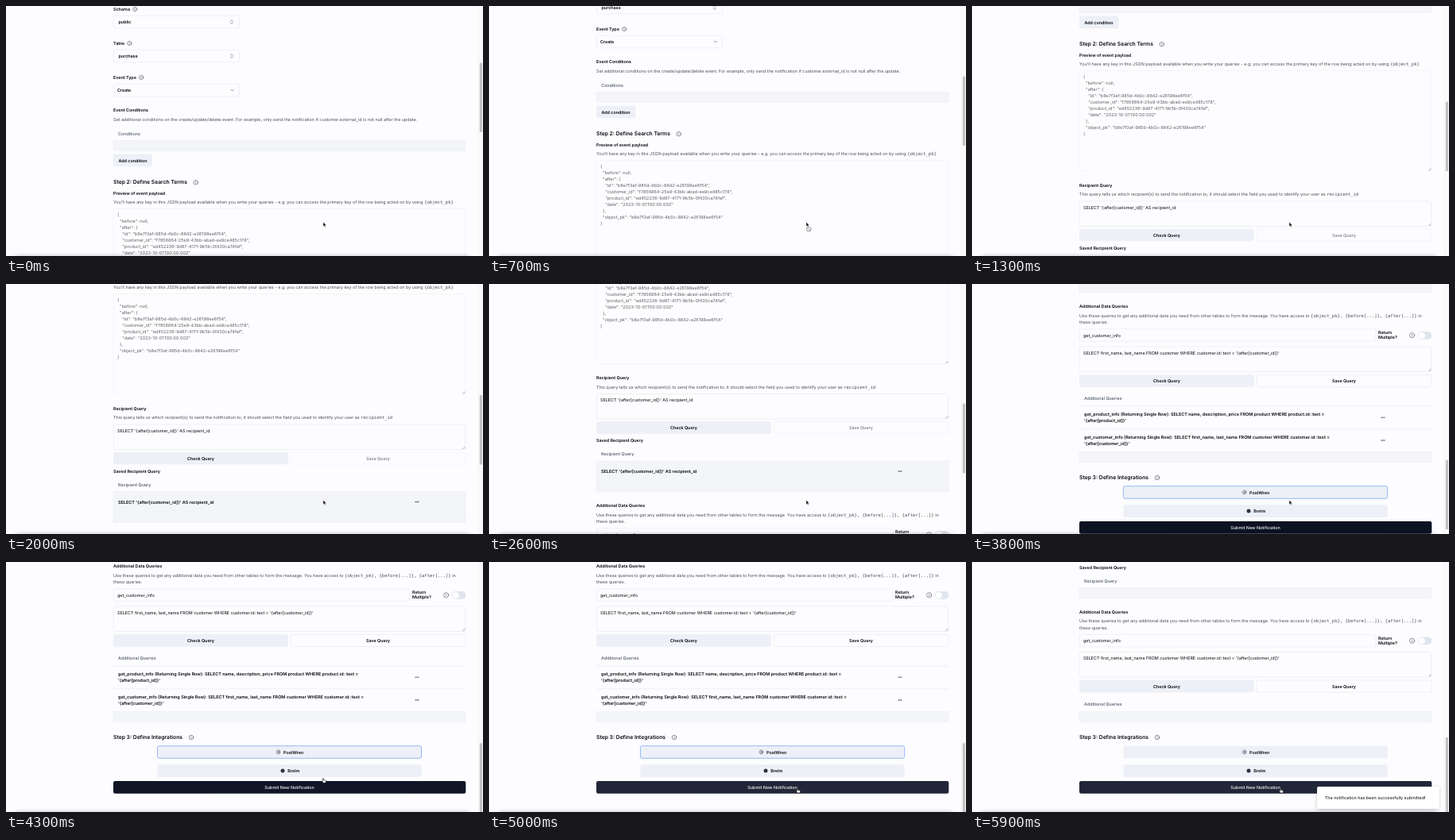
Animation of 600 by 315 pixels, one loop 6 s. Source, as an HTML page:

```html
<!DOCTYPE html>
<html lang="en">
<head>
<meta charset="utf-8">
<title>Notification form</title>
<style>
html, body { margin: 0; width: 100%; height: 100%; overflow: hidden; background: #fdfcfe; }
svg { display: block; width: 600px; height: 315px; }
text { font: 400 5.42px Inter, sans-serif; fill: #05070c; white-space: pre; text-rendering: geometricPrecision; }
.m { font-weight: 600; font-size: 5.36px; }
.row { font-weight: 600; font-size: 5.45px; }
.h { font-size: 6.75px; font-weight: 600; }
.d { fill: #4a4d55; }
.th { fill: #4d586b; font-weight: 500; }
.json { fill: #606267; font-size: 5.53px; }
.off { fill: #777a81; font-weight: 500; }
.inv { fill: #f8fafc; font-weight: 500; }
.c { text-anchor: middle; }
.code { font: 5.556px "DejaVu Sans Mono", monospace; }
.line { fill: none; stroke: #e5e8ee; stroke-width: .6; }
.dim { opacity: .6; }
.fill { fill: #edf0f6; }
.band { fill: #f3f5f8; stroke: #e8ebf0; stroke-width: .4; }
.ico { fill: none; stroke: #3c4350; stroke-width: .55; stroke-linecap: round; stroke-linejoin: round; }
</style>
</head>
<body>
<svg id="stage" viewBox="0 0 600 315"></svg>
<script>
const LOOP = 6000, STEP = 100, END = 555.5;
const LEFT = 135, RIGHT = 578;

// Text is placed by the middle of its capitals.
const text = (x, mid, str, cls = '') => `<text x="${x}" y="${mid + 2.15}" class="${cls}">${str}</text>`;
const code = str => `<tspan class="code">${str}</tspan>`;
const rect = (x, y, w, h, cls, r = 2.2, more = '') =>
  `<rect x="${x}" y="${y}" width="${w}" height="${h}" rx="${r}" class="${cls}" ${more}/>`;
const path = (d, more = 'class="ico"') => `<path d="${d}" ${more}/>`;
const info = (x, y, r = 2.6) => `<circle cx="${x}" cy="${y}" r="${r}" class="ico"/>` +
  path(`M${x} ${y - .1}v1.3M${x} ${y - 1.2}v.1`);
const dots = y => [515.2, 517, 518.8].map(x => `<circle cx="${x}" cy="${y}" r=".65" fill="#1f2937"/>`).join('');
const band = (y, h = 13) => rect(LEFT, y, RIGHT - LEFT, h, 'band', 0);

const select = (mid, label, x, chevron) => rect(LEFT + .3, mid - 7.8, 158, 15.6, 'line') +
  text(x, mid, label, 'm') + path(chevron);
const upDown = y => `M282.3 ${y - .9}l1.5 -1.5l1.5 1.5M282.3 ${y + .9}l1.5 1.5l1.5 -1.5`;
const down = y => `M283.3 ${y - .7}l1.5 1.5l1.5 -1.5`;
const area = (y, h, cls = '') => rect(LEFT + .3, y, RIGHT - LEFT - .6, h, 'line ' + cls) +
  path(`M574.6 ${y + h - 1}l2.4 -2.4M576 ${y + h - 1}l1 -1`, 'class="ico" stroke-opacity=".6"');
const queryButtons = (mid, saveCls, boxCls = '') => rect(LEFT, mid - 7.8, 219.7, 15.6, 'fill') +
  rect(358, mid - 7.6, 220, 15.2, 'line ' + boxCls) +
  text(245, mid, 'Check Query', 'm c') + text(468, mid, 'Save Query', saveCls + ' c');

const id = 'b8e7f3af-985d-4b0c-8842-e26198ee6f54';
const payload = [
  [0, '{'], [1, '"before": null,'], [1, '"after": {'],
  [2, `"id": "${id}",`],
  [2, '"customer_id": "f7856864-25e9-43bb-abad-ee9ce485c178",'],
  [2, '"product_id": "ed452236-9d87-4171-9b5b-0f430ca74faf",'],
  [2, '"date": "2023-10-01T00:00:00Z"'],
  [1, '},'], [1, `"object_pk": "${id}"`], [0, '}']
];

const upper = [
  text(LEFT, 4, 'Schema', 'm'), info(162.3, 4), select(20, 'public', 141.5, upDown(20)),
  text(LEFT, 47, 'Table', 'm'), info(155.3, 47), select(63, 'purchase', 141.5, upDown(63)),
  text(LEFT, 90, 'Event Type', 'm'), info(170.2, 90), select(106, 'Create', 140, down(106)),
  text(LEFT, 131, 'Event Conditions', 'm'),
  text(LEFT, 142.5, 'Set additional conditions on the create/update/delete event. For example, only send the notification if customer.external_id is not null after the update.', 'd'),
  text(141, 160.5, 'Conditions', 'th'), band(169.5),
  rect(LEFT, 186.7, 49, 15.6, 'fill'), text(159.5, 194.5, 'Add condition', 'm c'),
  text(LEFT, 222, 'Step 2: Define Search Terms', 'h'), info(238.7, 222.2, 2.8),
  text(LEFT, 235.5, 'Preview of event payload', 'm'),
  text(LEFT, 246.5, "You'll have any key in this JSON payload available when you write your queries - e.g. you can access the primary key of the row being acted on by using " + code('{object_pk}'), 'd'),
  area(255.5, 126.5, 'dim'),
  ...payload.map(([depth, s], i) => text(140 + 3.1 * depth, 263 + 7.94 * i, s, 'json')),
  text(LEFT, 399.5, 'Recipient Query', 'm'),
  text(LEFT, 411, 'This query tells us which recipient(s) to send the notification to; it should select the field you used to identify your user as ' + code('recipient_id'), 'd'),
  area(420, 31.5), text(140, 427.5, "SELECT '{after[customer_id]}' AS recipient_id"),
  queryButtons(462.5, 'off', 'dim'),
  text(LEFT, 478.5, 'Saved Recipient Query', 'm'), text(141, 495.5, 'Recipient Query', 'th')
];

const saved = [
  rect(LEFT, 504.5, 443, 26, 'band', 0, 'id="hover"'),
  text(141, 517.5, "SELECT '{after[customer_id]}' AS recipient_id", 'row'), dots(517.5)
];

const middle = [
  band(530.5),
  text(LEFT, 560.5, 'Additional Data Queries', 'm'),
  text(LEFT, 572.3, 'Use these queries to get any additional data you need from other tables to form the message. You have access to ' +
    code('{object_pk}, {before[...]}, {after[...]}') + ' in', 'd'),
  text(LEFT, 580.5, 'these queries.', 'd'),
  rect(LEFT + .3, 589.3, 372.5, 15.5, 'line'), text(140, 597, 'get_customer_info'),
  text(511, 593.8, 'Return', 'm'), text(511, 599.5, 'Multiple?', 'm'), info(553.6, 597.2, 3.1),
  rect(561, 592.6, 17.4, 9.6, '', 4.8, 'fill="#e0e5ed"'), '<circle cx="565.8" cy="597.4" r="4" fill="#fff"/>',
  area(611.5, 31.5),
  text(140, 619, "SELECT first_name, last_name FROM customer WHERE customer.id::text = '{after[customer_id]}'"),
  queryButtons(654.5, 'm'),
  text(141, 676.5, 'Additional Queries', 'th')
];

const extraRow = (y, name, fields) =>
  path(`M${LEFT} ${y}H${RIGHT}`, 'class="line"') +
  text(141, y + 10, `get_${name}_info (Returning Single Row): SELECT ${fields} FROM ${name} WHERE ${name}.id::text =`, 'row') +
  text(141, y + 18, `'{after[${name}_id]}'`, 'row') + dots(y + 14.2);
const extras = [
  extraRow(686.5, 'product', 'name, description, price'),
  extraRow(715.3, 'customer', 'first_name, last_name')
];

const lower = [
  band(744),
  text(LEFT, 776.5, 'Step 3: Define Integrations', 'h'), info(233, 776.5, 2.8),
  rect(190.4, 787.2, 332.2, 15.6, 'fill', 2.2, 'id="mail"'),
  '<circle cx="342.6" cy="795" r="1" class="ico"/>',
  path('M343.6 794v1.3a.75 .75 0 0 0 1.5 0v-.3a2.5 2.5 0 1 0 -1 2'),
  text(349, 795, 'PostWren', 'm'),
  rect(190.4, 810.8, 332.2, 15.6, 'fill'),
  '<circle cx="348" cy="818.6" r="2.5" fill="#2b3342"/>', text(354.3, 818.6, 'Brelm', 'm'),
  rect(LEFT, 831.6, 443.3, 15.6, '', 2.2, 'id="submit"'),
  text(356.6, 839.5, 'Submit New Notification', 'inv c')
];

const group = (name, parts) => `<g id="${name}">${parts.join('')}</g>`;
const stage = document.getElementById('stage');
stage.innerHTML = `
<defs>
  <filter id="blur" x="-10%" y="-100%" width="120%" height="300%"><feGaussianBlur stdDeviation="3.5"/></filter>
  <filter id="soft" x="-20%" y="-50%" width="140%" height="200%"><feDropShadow dx="0" dy="1.5" stdDeviation="2.5" flood-color="#000" flood-opacity=".2"/></filter>
</defs>
<rect width="600" height="315" fill="#fdfcfe"/>` +
  group('upper', upper) + group('saved', saved) + group('middle', middle) +
  group('extras', extras) + group('lower', lower) +
  '<rect x="594" width="6" height="315" fill="#fafafa"/>' + path('M594.2 0V315', 'stroke="#e8e8e8" stroke-width=".5"') +
  rect(595.8, 0, 3.2, 10, '', 1.6, 'id="thumb" fill="#c2c2c2"') +
  group('toast', [
    rect(434, 283, 153.5, 28, '', 2, 'fill="#fff" filter="url(#soft)"'),
    text(443.8, 297, 'The notification has been successfully submitted!')
  ]) +
  rect(10, 317, 575, 24, '', 6, 'fill-opacity=".45" filter="url(#blur)"') +
  group('arrow', [path('M0 0V5.6L1.3 4.4L2.2 6.4L3.1 6L2.2 4.1H4Z', 'fill="#000" stroke="#fff" stroke-width=".5"')]) +
  group('denied', ['<circle cx="3.3" cy="8.9" r="2.8" fill="#fff" stroke="#85878c" stroke-width=".9"/>',
    path('M1.4 7L5.2 10.8', 'stroke="#85878c" stroke-width=".9"')]) +
  group('hand', [path('M-.5 .4Q0 -.3 .6 .4V2.4L3 2.8Q3.6 3 3.5 3.7L3 6H.2L-1.7 3.6Q-1.5 2.7 -.5 3.5Z',
    'fill="#fff" stroke="#111" stroke-width=".55" stroke-linejoin="round"')]);

const el = {};
for (const node of stage.querySelectorAll('[id]')) el[node.id] = node;

const scrollKeys = [
  [100, 0], [300, 14], [450, 14], [700, 61], [1100, 145], [1500, 203], [2000, 243], [2300, 250],
  [2430, 250], [2700, 300], [3100, 394], [3500, 486], [3800, 532.5], [4000, 549], [4200, END]
];
const pointerX = [[4500, 399], [5000, 388]];
const pointerY = [[4500, 272.3], [5000, 285]];
const toastY = [[5300, 32], [5400, 14], [5500, 4], [5600, 0]];

function at(keys, t) {
  if (t <= keys[0][0]) return keys[0][1];
  for (let i = 1; i < keys.length; i++) {
    const [t0, a] = keys[i - 1], [t1, b] = keys[i];
    if (t <= t1) return a + (b - a) * (t - t0) / (t1 - t0);
  }
  return keys[keys.length - 1][1];
}
const move = (node, x, y) => node.setAttribute('transform', `translate(${x} ${y})`);
const show = (node, on) => node.setAttribute('visibility', on ? 'visible' : 'hidden');

function draw(t) {
  const y = at(scrollKeys, t), sent = t >= 5300;
  // Emptied tables shorten the page, which stays pinned to its end.
  move(el.upper, 0, (sent ? 83.5 : 0) - y);
  move(el.middle, 0, (sent ? 57.5 : 0) - y);
  for (const node of [el.saved, el.extras, el.lower]) move(node, 0, -y);
  show(el.saved, !sent);
  show(el.extras, !sent);
  el.hover.style.fill = t >= 1800 ? '#f3f5f8' : '#fdfcfe';

  el.mail.style.stroke = sent ? 'none' : '#6b9ff0';
  el.mail.style.strokeWidth = .7;
  el.submit.style.fill = t < 4300 ? '#0c1222' : t < 4400 ? '#101626' : t < 4500 ? '#191f30' : '#212738';

  const full = sent ? 1033 : 1116.5, size = 315 * 315 / full;
  el.thumb.setAttribute('y', (sent ? 315 - size : (246 + y) * 315 / full) + 1.8);
  el.thumb.setAttribute('height', size - 1);

  show(el.toast, sent);
  move(el.toast, 0, at(toastY, t));

  const hand = t >= 4300;
  for (const node of [el.arrow, el.denied, el.hand]) move(node, at(pointerX, t), at(pointerY, t));
  show(el.arrow, !hand);
  show(el.hand, hand);
  show(el.denied, t >= 500 && t < 1000);
}

const start = performance.now();
function tick() {
  const t = (performance.now() - start) % LOOP;
  draw(Math.floor(t / STEP) * STEP);
  requestAnimationFrame(tick);
}
tick();
</script>
</body>
</html>
```
